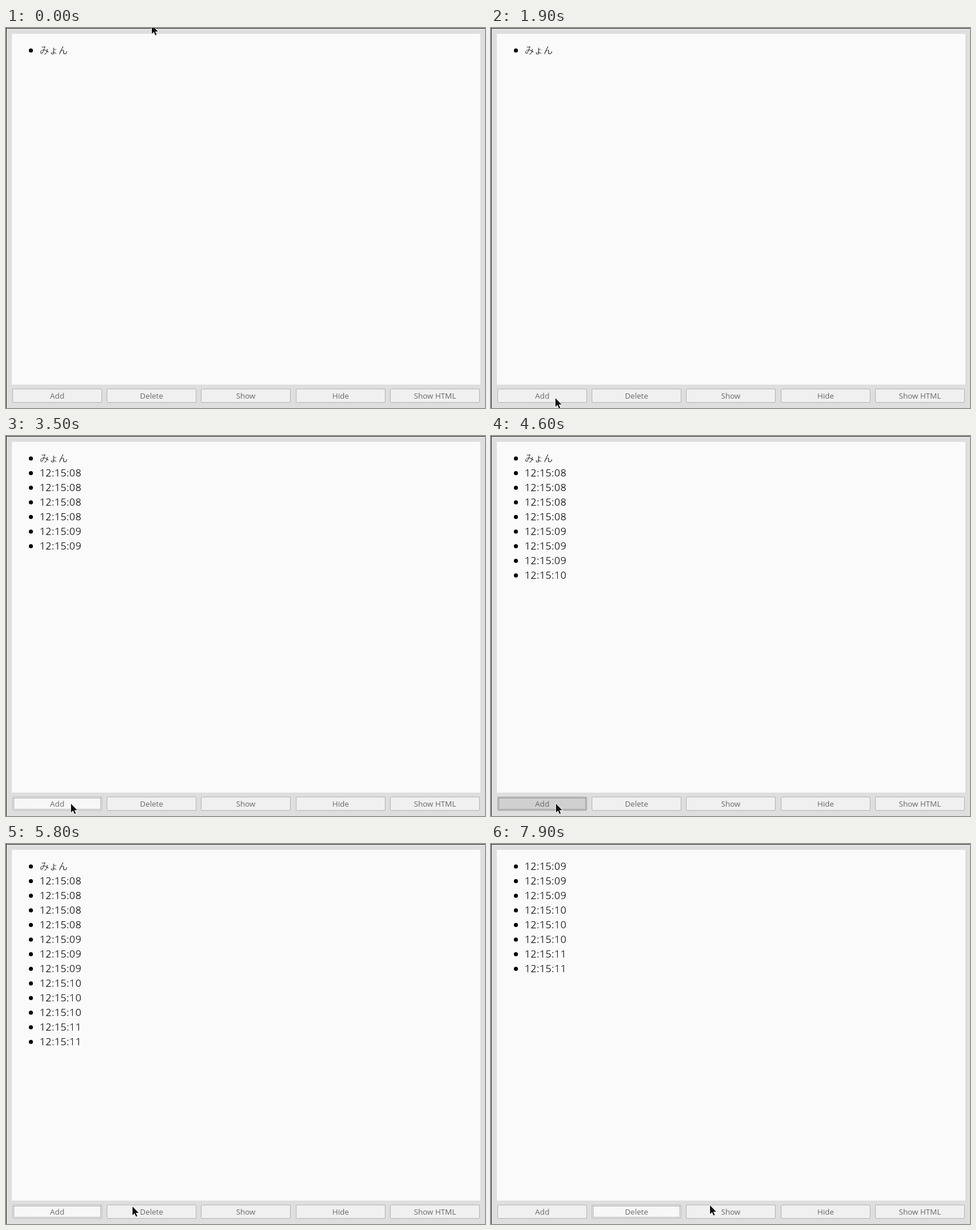
An HTML page that plays this animation: 818x650 px, repeating every 8000 ms.

```html
<!DOCTYPE html>
<html lang="en">
<head>
<meta charset="utf-8">
<title>List demo</title>
<style>
html, body { margin: 0; width: 100%; height: 100%; overflow: hidden; background: #dedede; }
#win { position: absolute; left: 0; top: 0; width: 818px; height: 650px; overflow: hidden; background: #dedede; }
#edge { position: absolute; inset: 0; border: solid #222; border-width: 1px 0 0 1px; }
#page { position: absolute; left: 10px; top: 10px; width: 800px; height: 600px; background: #fafafa; }
#list { position: absolute; left: 57.5px; top: 25px; margin: 0; padding: 0; list-style: none;
  font: 300 17px/25px "Open Sans", "Noto Sans", sans-serif; letter-spacing: .65px; color: #000;
  -webkit-text-stroke: .25px #000; }
#list li { position: relative; height: 25px; white-space: nowrap; }
#list li::before { content: ""; position: absolute; left: -18.5px; top: 10px; width: 7px; height: 7px;
  border-radius: 50%; background: #000; }
#list .jp { font: 300 16px/25px "Noto Sans CJK JP", "Noto Sans CJK", sans-serif; letter-spacing: 0;
  -webkit-text-stroke: .4px #fafafa; }
.btn { position: absolute; top: 617px; width: 153px; height: 24px; box-sizing: border-box;
  border: 1px solid #b4b4b4; border-radius: 2px; background: #f0f0f0;
  font: 400 13.1px/22px "Open Sans", "Noto Sans", sans-serif; color: #686868; text-align: center; }
.btn.focus { background: #f7f7f7; }
.btn.focus::after { content: ""; position: absolute; inset: 1px; border: 1px dotted #666; }
.btn.down { background: #d0d0d0; border-color: #9c9c9c; }
#cursor { position: absolute; left: 0; top: 0; overflow: visible; }
</style>
</head>
<body>
<div id="win">
  <div id="edge"></div>
  <div id="page"></div>
  <ul id="list"></ul>
  <div id="bar"></div>
  <svg id="cursor" width="14" height="20">
    <path d="M0 0V15L3.5 11.8L6 17.5L8.2 16.5L5.8 11H10.5Z" fill="#111" stroke="#fff" paint-order="stroke" stroke-width="1.6"/>
  </svg>
</div>
<script>
const LOOP = 8000, STEP = 100;
const $ = id => document.getElementById(id);
const snap = t => Math.round(t / STEP) * STEP;

// Evenly spaced clicks, given by the time the mouse button is released.
const burst = (from, count, gap) => Array.from({ length: count }, (_, i) => snap(from + i * gap));
const adds = [...burst(2400, 5, 200), ...burst(3500, 3, 450), ...burst(4700, 4, 270)];
const deletes = burst(6500, 5, 275);

// Pointer moves towards (x, y), starting from wherever the last one ended.
const home = { x: 249, y: -5 };
const moves = [
  { at: 500, dur: 0, x: -14, y: 640 },
  { at: 800, dur: 700, x: 107, y: 620 },
  { at: 1600, dur: 300, x: 110, y: 633 },
  { at: 1900, dur: 200, x: 111, y: 629 },
  { at: 5500, dur: 300, x: 216, y: 620 },
  { at: 7900, dur: 0, x: 374, y: 618 },
];

const buttons = ["Add", "Delete", "Show", "Hide", "Show HTML"].map((name, i) => {
  const b = document.createElement("div");
  b.className = "btn";
  b.textContent = name;
  b.style.left = Math.floor(11.4 + i * 161.25) + "px";
  $("bar").append(b);
  return b;
});

const stamp = t => "12:15:" + String(8 + Math.floor((t - 2100) / 1000)).padStart(2, "0");
const rows = ["みょん", ...adds.map(stamp)].map((text, i) => {
  const li = document.createElement("li");
  li.textContent = text;
  li.classList.toggle("jp", i === 0);
  $("list").append(li);
  return li;
});

const done = (clicks, t) => clicks.filter(c => t >= c).length;
const held = (clicks, t) => clicks.includes(t + STEP);

function pointer(t) {
  let { x, y } = home;
  for (const m of moves) {
    if (t < m.at) break;
    const k = m.dur ? Math.min(1, (t - m.at) / m.dur) : 1;
    x += (m.x - x) * k;
    y += (m.y - y) * k;
  }
  return [Math.round(x), Math.round(y)];
}

function draw(t) {
  const last = done(adds, t), first = done(deletes, t);
  rows.forEach((li, i) => li.style.display = i >= first && i <= last ? "" : "none");
  const begun = clicks => t >= clicks[0] - STEP;
  const focus = begun(deletes) ? 1 : begun(adds) ? 0 : -1;
  const down = held(adds, t) ? 0 : held(deletes, t) ? 1 : -1;
  buttons.forEach((b, i) => {
    b.classList.toggle("focus", i === focus);
    b.classList.toggle("down", i === down);
  });
  const [x, y] = pointer(t);
  $("cursor").style.transform = `translate(${x}px, ${y}px)`;
}

const start = performance.now();
function tick() {
  const t = (performance.now() - start) % LOOP;
  draw(Math.floor(t / STEP) * STEP);
  requestAnimationFrame(tick);
}
tick();
</script>
</body>
</html>
```
